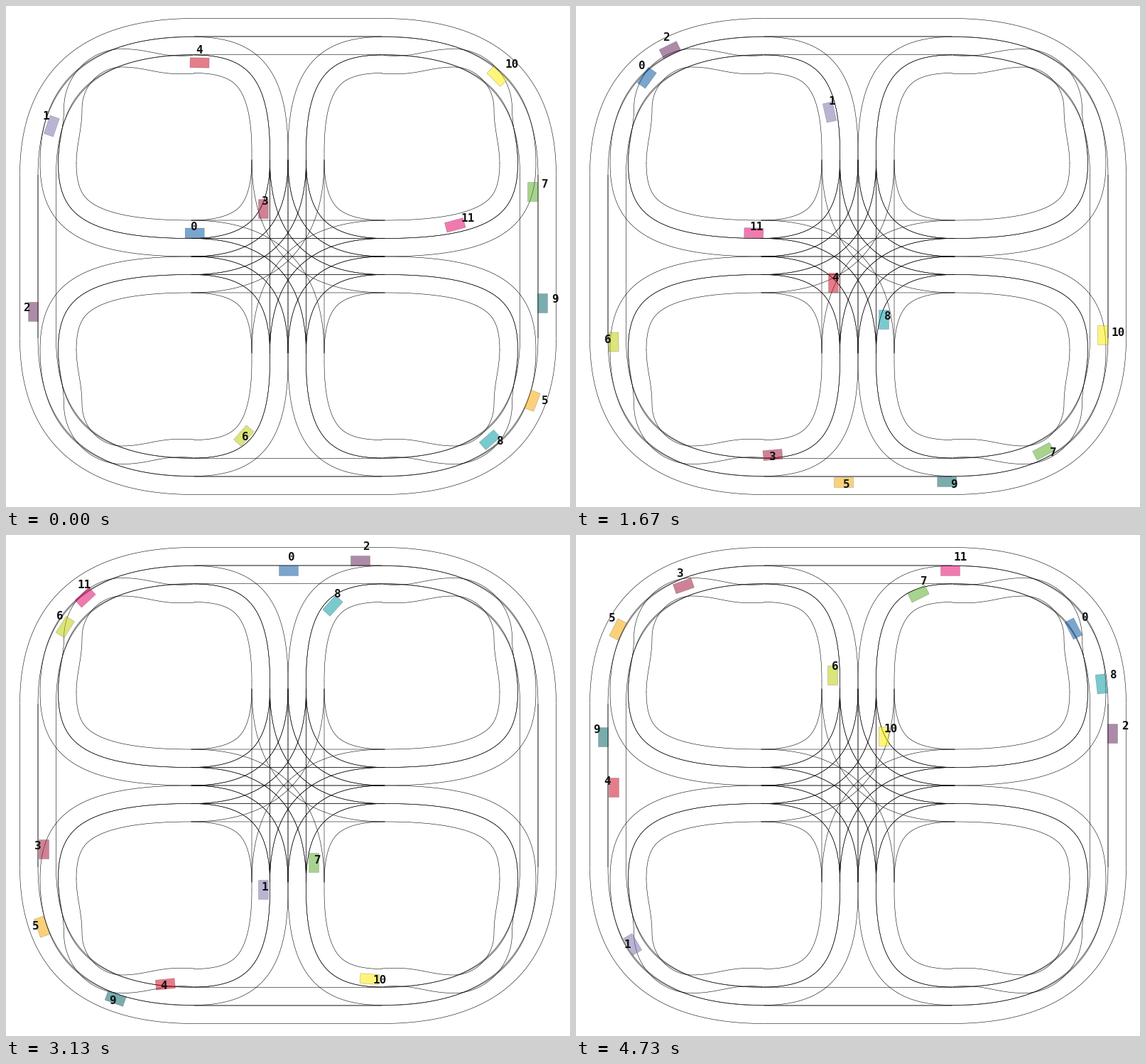
A matplotlib script for the animation above (4800 ms loop, 794 by 706 pixels).

```python
import numpy as np
import matplotlib.pyplot as plt
from matplotlib.animation import FuncAnimation
from matplotlib.collections import LineCollection
from matplotlib.patches import Polygon

W, H, DPI = 794, 706, 64
CX, CY = 397, 353
PX = 72 / DPI                       # one pixel in points
LOOP_MS, TICK_MS, STEPS = 4800, 30, 72
LANE = 25.5


# ---- curves -------------------------------------------------------------

def bezier(a, b, c, d, n=50):
    a, b, c, d = (np.array(p, float) for p in (a, b, c, d))
    t = np.linspace(0, 1, n)[:, None]
    return (1-t)**3*a + 3*(1-t)**2*t*b + 3*(1-t)*t**2*c + t**3*d


def bend(p, q, k=0.665):
    """Corner that is horizontal at p and vertical at q."""
    return bezier(p, (p[0] + k*(q[0]-p[0]), p[1]),
                  (q[0], q[1] + k*(p[1]-q[1])), q)


def turn_in(q, p, k=0.665):
    """Corner that is vertical at q and horizontal at p."""
    return bend(p, q, k)[::-1]


def offset(pts, d):
    """Parallel curve at distance d."""
    g = np.gradient(pts, axis=0)
    g /= np.hypot(*g.T)[:, None]
    return pts + d*np.column_stack([-g[:, 1], g[:, 0]])


fig = plt.figure(figsize=(W/DPI, H/DPI), dpi=DPI, facecolor="white")
ax = fig.add_axes([0, 0, 1, 1])
ax.set_xlim(0, W)
ax.set_ylim(H, 0)
ax.axis("off")


# ---- road map: one quadrant, mirrored to the other three -----------------

lines = []


def road(pts, n=1):
    pts = np.array(pts, float) - (CX, CY)
    for flip in ((1, 1), (-1, 1), (1, -1), (-1, -1)):
        lines.extend([pts*flip + (CX, CY)]*n)


# turns in the crossing; shared lane borders are drawn twice
wide_turn = bend((261, 378.5), (422.5, 217))
for i, n in enumerate((1, 2, 2, 2, 1)):
    road(offset(wide_turn, LANE*(i-3)), n)

# lane borders of the small loops, from inside to outside
top_right = bend((265, 43.5), (397, 205), 0.70)
bottom_left = bend((261, 353), (48, 222), 0.72)
for i, n in enumerate((1, 2, 1)):
    x, y, inward = 346 + LANE*i, 302 + LANE*i, LANE*(2-i)
    road(offset(top_right, inward), n)
    road(offset(bottom_left, inward), n)
    road([(x, 205), (x, CY)], n)
    road([(261, y), (CX, y)], n)
merge = bend((265, 43.5), (48, 222))
road(merge)
road(offset(merge, -LANE))

# ring
middle = bend((265, 43), (45, 238))
for i, n in ((1, 1), (0, 2), (-1, 1)):
    x, y = 45 - LANE*i, 43 - LANE*i
    road(offset(middle, LANE*i))
    road([(265, y), (CX, y)], n)
    road([(x, 238), (x, CY)], n)

# wavy lane
wave = np.vstack([bezier((265, 95), (215, 99), (200, 86), (163, 86)),
                  bezier((163, 86), (135, 86), (107, 110), (107, 145)),
                  bezier((107, 145), (107, 175), (99, 195), (99, 222))])
road(wave)
road(offset(wave, LANE))

ax.add_collection(LineCollection(lines, colors="black", linewidths=0.55*PX,
                                 snap=False, zorder=1))


# ---- routes -------------------------------------------------------------

class Route:
    def __init__(self, *parts, closed=True):
        pts = np.vstack(parts)
        if closed:
            pts = np.vstack([pts, pts[:1]])
        d = np.r_[0, np.cumsum(np.hypot(*np.diff(pts, axis=0).T))]
        self.length, self.closed = d[-1], closed
        # even spacing of about one pixel
        self.s = np.linspace(0, d[-1], int(d[-1]))
        self.pts = np.column_stack([np.interp(self.s, d, c) for c in pts.T])

    def at(self, s):
        if self.closed:
            s %= self.length
        return np.array([np.interp(s, self.s, c) for c in self.pts.T])

    def locate(self, stops):
        s = [self.s[np.hypot(*(self.pts - p).T).argmin()] for p in stops]
        return np.unwrap(s, period=self.length) if self.closed else np.array(s)


ring = Route(turn_in((38, 235), (270, 35.5)),
             bend((524, 35.5), (755, 235)),
             turn_in((755, 470), (524, 670.5)),
             bend((270, 670.5), (38, 470)))

left_parts = (bezier((53, 235), (53, 150), (110, 66), (185, 66)),
              bezier((185, 66), (215, 66), (240, 80), (273, 80)),
              bend((273, 80), (361.5, 195)),
              turn_in((361.5, 511), (265, 633)),
              bezier((265, 633), (235, 629), (205, 636), (175, 639)),
              bend((175, 639), (53, 470), 0.56))
left = Route(*left_parts)
right = Route(*[np.array([W, H]) - p for p in left_parts])

through = Route(turn_in((715, 215), (540, 319)),
                bend((265, 320), (80, 225)),
                bezier((80, 225), (80, 140), (64, 50), (262, 50)),
                bend((540, 50), (722, 240)), closed=False)


# ---- cars ---------------------------------------------------------------

BOX = np.array([(-13.5, -7), (13.5, -7), (13.5, 7), (-13.5, 7)])


class Car:
    """Drives along a route with steady acceleration past three points."""

    def __init__(self, name, color, route, start, halfway, end):
        self.route = route
        dist = route.locate((start, halfway, end))
        self.dist = np.poly1d(np.polyfit((0, 37, STEPS-1), dist, 2))
        self.box = Polygon(BOX, closed=True, facecolor=(color, 0.52),
                           edgecolor=(0, 0, 0, 0.3), linewidth=0.5*PX, zorder=2)
        ax.add_patch(self.box)
        self.label = ax.text(0, 0, str(name), family="DejaVu Sans Mono",
                             weight="bold", size=16*PX, color="#111111",
                             ha="left", va="baseline", zorder=3)

    def draw(self, step):
        s = self.dist(step)
        x, y = self.route.at(s)
        dx, dy = self.route.at(s + 4) - self.route.at(s - 4)
        a = np.arctan2(dy, dx)
        c, s = np.cos(a), np.sin(a)
        self.box.set_xy(BOX @ np.array([(c, s), (-s, c)]) + (x, y))
        # labels spread outwards a little from the cars
        self.label.set_position((x + 0.0378*(x - 278) - 4.8,
                                 y + 0.0357*(y - 598) + 5.8))


trips = (
    ("#00549f", through, (266, 320), (256, 49), (705, 130)),
    ("#7a6fac", left, (66, 170), (362, 338), (80, 577)),
    ("#612158", ring, (40, 430), (329, 36), (755, 280)),
    ("#a11035", left, (363, 285), (96, 598), (151, 69)),
    ("#cc071e", left, (273, 80), (353, 571), (53, 355)),
    ("#f6a800", ring, (741, 556), (175, 660), (60, 133)),
    ("#bdcd00", left, (332, 603), (53, 283), (362, 198)),
    ("#57ab27", right, (739, 262), (470, 614), (483, 85)),
    ("#0098a1", right, (682, 612), (432, 251), (737, 210)),
    ("#006165", ring, (756, 419), (322, 671), (38, 284)),
    ("#ffed00", right, (694, 96), (666, 627), (431, 284)),
    ("#e30066", through, (634, 316), (78, 249), (526, 49)),
)
cars = [Car(i, *trip) for i, trip in enumerate(trips)]


def update(tick):
    # the picture moves on in 72 steps, timed to hundredths of a second
    step = (tick*TICK_MS + TICK_MS - 5) * STEPS // LOOP_MS
    for car in cars:
        car.draw(step)
    return []


anim = FuncAnimation(fig, update, frames=LOOP_MS//TICK_MS, interval=TICK_MS,
                     init_func=lambda: update(0), repeat=True, repeat_delay=0)
plt.show()
```
